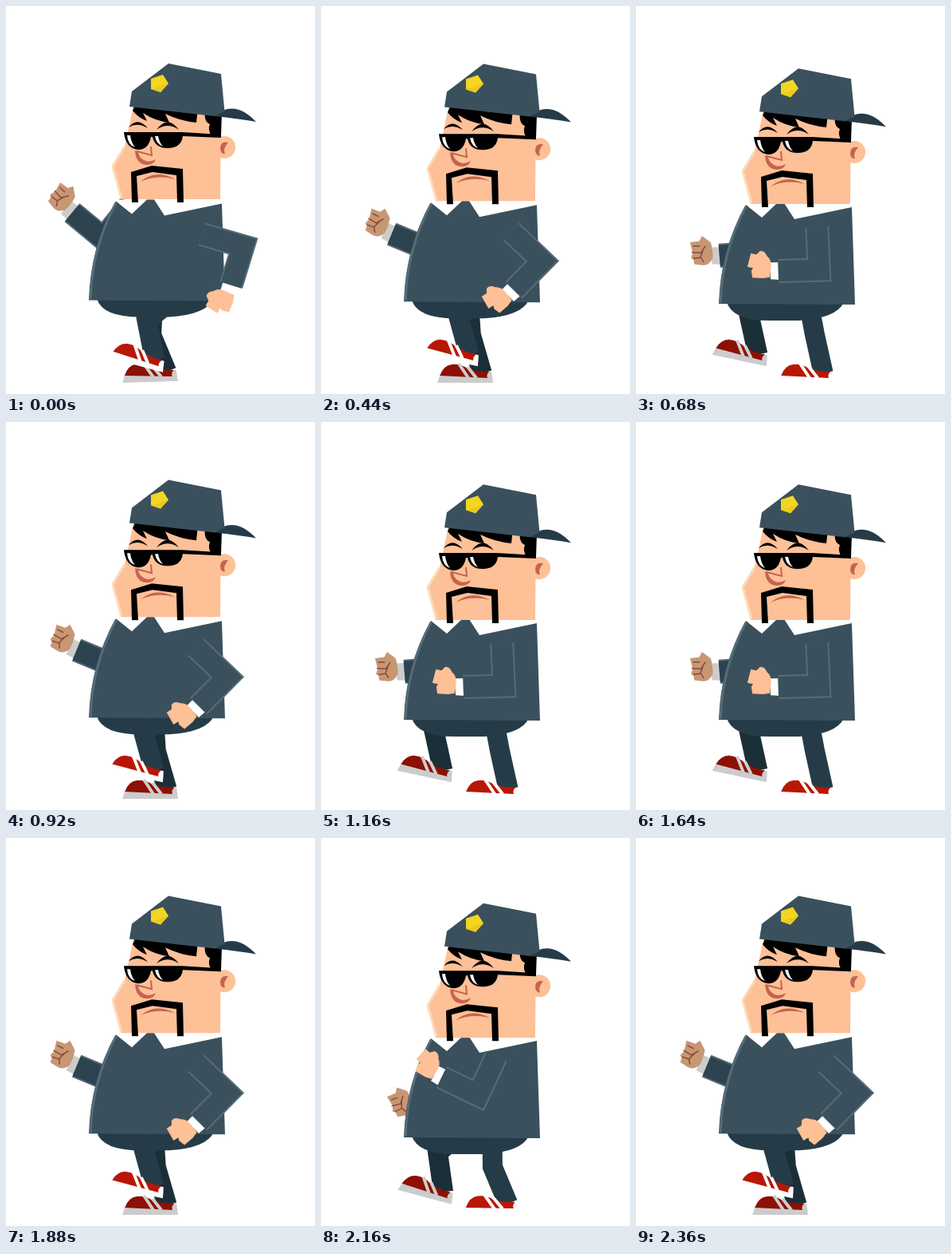
Animation, 388 px wide and 486 px high, one loop 2.4 s. Source, as an HTML page with a canvas:

```html
<!DOCTYPE html>
<html lang="en">
<head>
<meta charset="utf-8">
<title>Walking guard</title>
<style>
html, body { margin: 0; width: 100%; height: 100%; overflow: hidden; background: #fff; }
canvas { display: block; }
</style>
</head>
<body>
<canvas id="stage" width="388" height="486"></canvas>
<script>
const ctx = document.getElementById('stage').getContext('2d');
const CYCLE = 12, STEP = 40, RAD = Math.PI / 180;
const CLOTH = '#3a515d', EDGE = '#566c78', DARK = '#253c48', SHADE = '#1b2f38';
const SKIN = '#fdc097', LINE = '#c5644f';

// Cosine wave over one walk cycle with its crest at the given step
const wave = (k, crest) => Math.cos((k - crest) * 2 * Math.PI / CYCLE);
const crestOnly = (k, crest) => Math.max(0, wave(k, crest));
const polar = ([x, y], r, deg) => [x + r * Math.cos(deg * RAD), y + r * Math.sin(deg * RAD)];
const fill = (d, color) => { ctx.fillStyle = color; ctx.fill(new Path2D(d)); };

function line(d, color, width) {
  ctx.strokeStyle = color;
  ctx.lineWidth = width;
  ctx.stroke(new Path2D(d));
}

function placed(x, y, degrees, draw) {
  ctx.save();
  ctx.translate(x, y);
  ctx.rotate(degrees * RAD);
  draw();
  ctx.restore();
}

// Two equal bones, bent towards the walking direction
function kneeBetween(hip, ankle, bone) {
  const dx = ankle[0] - hip[0], dy = ankle[1] - hip[1], reach = Math.hypot(dx, dy);
  const bend = Math.sqrt(Math.max(0, bone * bone - reach * reach / 4)) / reach;
  return [hip[0] + dx / 2 - dy * bend, hip[1] + dy / 2 + dx * bend];
}

function leg(k, hipX, footX, cloth, red, white) {
  const toeDown = 20 * crestOnly(k, 8.4) ** 2;
  const tilt = 15 * crestOnly(k, 0) - toeDown;
  const x = footX - 27 * wave(k, 11.5);
  const y = 472 - 21 * crestOnly(k, 10.3) - 1.2 * toeDown;
  const hip = [hipX, 362], ankle = polar([x, y], 18.4, tilt - 139);
  line(`M${hip}L${kneeBetween(hip, ankle, 50)}L${ankle}`, cloth, 25);
  placed(x, y, tilt, () => {
    fill('M-70 0L-67 -9L-8 -14L-2 -14L0 0Z', white);
    fill('M-67 -9Q-62 -22 -52 -23Q-41 -24 -32 -18Q-20 -14 -5 -14Q-9 -10 -7 -6Z', red);
    line('M-43 -24L-31 -6M-32 -20L-21 -6', white, 4);
  });
}

function arm(shoulder, angle, cloth, edge, cuff, hand) {
  const elbow = polar(shoulder, 54, angle);
  const wrist = polar(elbow, 51, angle + 91);
  const path = `M${shoulder}L${elbow}L${wrist}`;
  placed(...wrist, angle + 91, () => fill('M-3 -11L10 -10L10 11L-3 11Z', cuff));
  line(path, edge, 30);
  line(path, cloth, 26);
  placed(...wrist, angle + 91, hand);
}

function palm() {
  ctx.rotate(-133 * RAD);
  fill('M-10 3Q-16 -4 -23 -3Q-31 -6 -34 -1L-34 5L-40 9L-31 24L-25 20L-24 24L-17 29L-7 20L-2 13Z', SKIN);
}

function fist() {
  ctx.rotate(-203 * RAD);
  fill('M-25 -32L-14 -28L-8 -32L-2 -20Q-4 -9 -9 -1Q-17 5 -24 1L-33 -5L-31 -11L-33 -14L-28 -19Z', '#c79774');
  line('M-29 -20L-19 -14L-10 -19M-31 -12L-22 -9L-15 -16M-24 -26L-16 -22M-22 -9L-21 -2', '#8b493a', 1.5);
}

function torso() {
  fill('M138 244L271 244L271 252L200 270L150 266Z', '#fff');
  fill('M114 368Q121 391 168 391L205 391Q252 388 261 368Z', DARK);
  fill('M138 246L158 262L177 244L186 244L199 264L271 249L275 371L104 370Q106 302 138 246Z', CLOTH);
  line('M106 369Q108 304 138 248', EDGE, 3);
}

function head() {
  fill('M162 118L270 120L269 244L144 244L133 203L149 178Z', SKIN);
  line('M149 178L134 203L145 243', '#ffdab7', 3);
  fill('M269 166A14 14 0 1 1 269 192Z', SKIN);
  fill('M279 173Q269 171 269 181Q270 188 275 187Q272 181 279 173Z', LINE);
  fill('M163 124L159 133Q166 142 177 146L172 136Q187 146 205 148L200 137Q218 146 239 148L241 130Z', '#000');
  fill('M263 132L271 136L270 165L258 165Q253 157 256 150Q248 147 250 132Z', '#000');
  fill('M154 154Q165 140 178 155Q165 147 154 154ZM189 157Q203 138 217 157Q203 147 189 157Z', '#000');
  line('M182 178L183 189L164 184', LINE, 2);
  fill('M162 183Q163 201 178 201Q186 200 188 194Q179 199 173 195Q166 191 166 184Z', LINE);
  fill('M148 160L221 160L270 163L270 167L222 165Q220 180 203 180Q187 180 184 166L182 166Q179 182 166 182Q150 180 148 160Z', '#000');
  fill('M152 164Q153 176 162 179Q157 173 156 164ZM187 165Q189 175 197 178Q192 172 191 165Z', '#fff');
  fill('M157 210L183 202L222 206L223 248L215 248L214 214L184 210L164 215L166 248L158 248Z', '#000');
  fill('M169 222Q188 206 212 219Q190 213 169 222Z', LINE);
}

function cap() {
  fill('M262 138Q286 116 314 145Q290 141 262 138Z', DARK);
  fill('M155 126L158 107L204 72L270 85L274.5 132L262 138Z', CLOTH);
  fill('M182 91L197 86L204 97L194 108L182 104Z', '#f4d521');
  fill('M182 104L204 97L194 108Z', '#ecc91f');
}

function draw(k) {
  const swing = wave(k, 1.34);
  const nearAngle = 65.5 - 64.7 * swing;
  const bob = .33 - .85 * swing;

  ctx.fillStyle = '#fff';
  ctx.fillRect(0, 0, 388, 486);
  arm([153 + 3 * wave(k, 0), 255 - 12 * wave(k, 2)], 98 + 40 * swing, '#2d434f', '#506672', '#ccc', fist);
  leg(k + CYCLE / 2, 185, 190, SHADE, '#8c1005', '#ccc');
  leg(k, 215, 223, DARK, '#b91706', '#fff');
  placed(0, 5 * bob, 0, torso);
  placed(0, 6.5 * bob, 0, head);
  placed(0, Math.max(0, 10 * bob), 0, cap);
  arm([250 - .26 * nearAngle, 288 - .13 * nearAngle], nearAngle, CLOTH, EDGE, '#fff', palm);
}

function tick() {
  draw(Math.floor(performance.now() / STEP) % CYCLE);
  requestAnimationFrame(tick);
}
tick();
</script>
</body>
</html>
```
